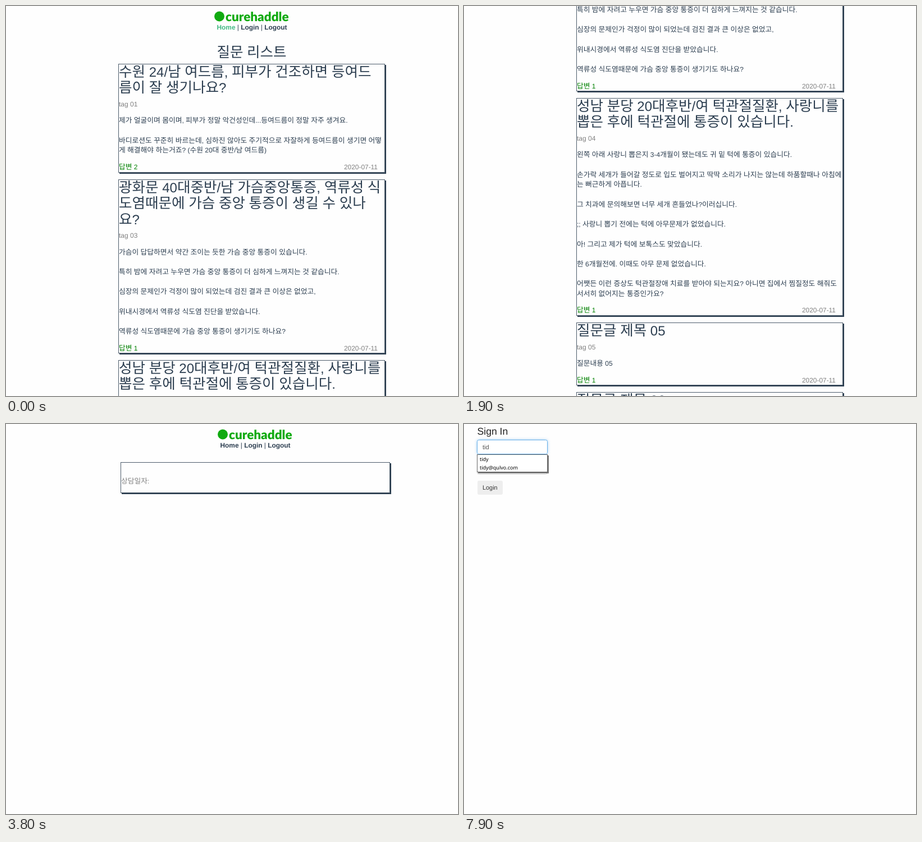
Recreate the animation shown at these times as an HTML page. Size 805 px wide and 695 px high, loop 8 s.

```html
<!DOCTYPE html>
<html lang="ko">
<head>
<meta charset="utf-8">
<style>
  html, body { margin: 0; width: 100%; height: 100%; overflow: hidden; background: #fefefe; }
  svg { display: block; width: 805px; height: 695px; }
  text {
    font-family: "Liberation Sans", "Noto Sans CJK KR", "Noto Sans CJK", sans-serif;
    text-rendering: geometricPrecision;
    white-space: pre;
  }
  .ko { font-family: "Noto Sans CJK KR", "Noto Sans CJK", sans-serif; }
  .logo { font-family: Lato, sans-serif; font-weight: 900; }
  .menu { font-family: "Noto Sans", sans-serif; }
</style>
</head>
<body>
<svg id="stage" viewBox="0 0 805 695"></svg>
<script>
const INK = '#2c3e50', GREEN = '#10aa10', GRAY = '#808080';
const TITLE_LINE = 28.3, BODY_LINE = 17.68;

// Hangul is set slightly larger than the Latin text beside it.
const mixed = (s, size) =>
  s.replace(/[가-힣]+/g, run => `<tspan class="ko" font-size="${size * 1.065}">${run}</tspan>`);

const text = (s, x, mid, size, fill, attrs = '') =>
  `<text x="${x}" y="${mid + size * 0.36}" font-size="${size}" fill="${fill}" ${attrs}>${mixed(s, size)}</text>`;

const rect = (x, y, w, h, fill, attrs = '') =>
  `<rect x="${x}" y="${y}" width="${w}" height="${h}" fill="${fill}" ${attrs}/>`;

const panel = (x, y, w, h) =>
  rect(x + 2, y + 2, w, h, INK) +
  rect(x + 0.5, y + 0.5, w - 1, h - 1, '#fefefe', 'stroke="#4d5c6b"');

const header = (cx, homeColor) => `
  <circle cx="${cx - 58}" cy="18.5" r="9" fill="${GREEN}"/>
  ${text('curehaddle', cx - 47, 18.5, 22.5, GREEN, 'class="logo"')}
  <text x="${cx}" y="42" font-size="11.9" font-weight="bold" text-anchor="middle" fill="${INK}"><tspan
    fill="${homeColor}">Home</tspan><tspan font-weight="normal"> | </tspan>Login<tspan
    font-weight="normal"> | </tspan>Logout</text>`;

const questions = [
  { tag: '01', answers: 2,
    title: ['수원 24/남 여드름, 피부가 건조하면 등여드', '름이 잘 생기나요?'],
    body: ['제가 얼굴이며 몸이며, 피부가 정말 악건성인데...등여드름이 정말 자주 생겨요.', '',
      '바디로션도 꾸준히 바르는데, 심하진 않아도 주기적으로 자잘하게 등여드름이 생기면 어떻',
      '게 해결해야 하는거죠? (수원 20대 중반/남 여드름)'] },
  { tag: '03', answers: 1,
    title: ['광화문 40대중반/남 가슴중앙통증, 역류성 식', '도염때문에 가슴 중앙 통증이 생길 수 있나', '요?'],
    body: ['가슴이 답답하면서 약간 조이는 듯한 가슴 중앙 통증이 있습니다.', '',
      '특히 밤에 자려고 누우면 가슴 중앙 통증이 더 심하게 느껴지는 것 같습니다.', '',
      '심장의 문제인가 걱정이 많이 되었는데 검진 결과 큰 이상은 없었고,', '',
      '위내시경에서 역류성 식도염 진단을 받았습니다.', '',
      '역류성 식도염때문에 가슴 중앙 통증이 생기기도 하나요?'] },
  { tag: '04', answers: 1,
    title: ['성남 분당 20대후반/여 턱관절질환, 사랑니를', '뽑은 후에 턱관절에 통증이 있습니다.'],
    body: ['왼쪽 아래 사랑니 뽑은지 3-4개월이 됐는데도 귀 밑 턱에 통증이 있습니다.', '',
      '손가락 세개가 들어갈 정도로 입도 벌어지고 딱딱 소리가 나지는 않는데 하품할때나 아침에',
      '는 뻐근하게 아픕니다.', '',
      '그 치과에 문의해보면 너무 세개 흔들었나?이러십니다.', '',
      ';; 사랑니 뽑기 전에는 턱에 아무문제가 없었습니다.', '',
      '아! 그리고 제가 턱에 보톡스도 맞았습니다.', '',
      '한 6개월전에. 이때도 아무 문제 없었습니다.', '',
      '어쨋든 이런 증상도 턱관절장애 치료를 받아야 되는지요? 아니면 집에서 찜질정도 해줘도',
      '서서히 없어지는 통증인가요?'] },
  ...['05', '06', '07'].map(n => ({ tag: n, answers: 1, title: ['질문글 제목 ' + n], body: ['질문내용 ' + n] })),
];

let nextCardY = 103;
const cards = questions.map(({ tag, answers, title, body }) => {
  const y = Math.round(nextCardY);
  const tagY = y + title.length * TITLE_LINE + 15;
  const bodyY = tagY + 29.5;
  const footY = bodyY + (body.length - 1) * BODY_LINE + 29.5;
  const height = title.length * TITLE_LINE + body.length * BODY_LINE + 78.3;
  nextCardY += height;
  return panel(200, y, 475, Math.round(height) - 12) +
    title.map((s, i) => text(s, 201, y + 14.5 + i * TITLE_LINE, 24, INK)).join('') +
    text('tag ' + tag, 201, tagY, 12, GRAY) +
    body.map((s, i) => s && text(s, 201, bodyY + i * BODY_LINE, 12, INK)).join('') +
    text('답변 ' + answers, 201, footY, 12, '#008000') +
    text('2020-07-11', 602, footY, 11.9, GRAY);
}).join('');

const field = (y, id, hint) =>
  rect(23.5, y + 0.5, 125, 25, '#fff', `id="${id}" rx="3" stroke="#ccc"`) +
  text(hint, 33, y + 13, 10.4, '#999', `id="${id}Hint" clip-path="url(#fieldClip)"`);

const $ = id => document.getElementById(id);

$('stage').innerHTML = `
  <defs><clipPath id="fieldClip"><rect x="33" y="0" width="106" height="200"/></clipPath></defs>
  <g id="list">
    ${header(438, '#42b983')}
    ${text('질문 리스트', 437.5, 82, 24, INK, 'text-anchor="middle"')}
    ${cards}
  </g>
  <g id="detail">
    ${header(444, INK)}
    ${rect(424, 43, 32, 1, INK, 'id="underline"')}
    ${panel(204, 68, 480, 55)}
    ${text('상담일자:', 205, 102, 12, GRAY)}
  </g>
  <g id="signIn">
    ${text('Sign In', 23.5, 12.5, 17.6, '#222')}
    ${field(28, 'email', '이메일 주소를 입력 해주세요')}
    ${field(64, 'password', '비밀번호를 입력해 주세요')}
    ${rect(24, 101, 45, 25, '#eee', 'rx="3"')}
    ${text('Login', 33, 113.5, 10.9, '#333')}
    ${text('', 33, 41, 11, '#555', 'id="typed"')}
    ${rect(36, 35, 1, 12, '#333', 'id="caret"')}
    <g id="suggestions"></g>
  </g>`;

const show = (id, on) => $(id).setAttribute('display', on ? 'inline' : 'none');

const accounts = ['tidy', 'tidy@qulvo.com', 'todo@qulvo.com', 'admin', 'guest'];
const suggestions = count => {
  if (!count) return '';
  const h = count * 15 + 2;
  return rect(25, 56, 126, h, '#777') +
    rect(23.5, 54.5, 125, h - 1, '#fff', 'stroke="#666"') +
    accounts.slice(0, count).map((s, i) =>
      text(s, 28, 62.5 + i * 14.8, 9, '#000', 'class="menu"')).join('');
};

// Each scroll: first step, number of 100 ms steps, start and end offset.
const scrolls = [[500, 3, 0, 220], [900, 4, 220, 450], [1900, 4, 450, 556], [2700, 6, 556, 0]];
const smooth = p => p * p * (3 - 2 * p);

function scrollAt(t) {
  let y = 0;
  for (const [start, steps, from, to] of scrolls) {
    if (t < start) break;
    const p = Math.min(1, (Math.floor((t - start) / 100) + 1) / steps);
    y = from + (to - from) * smooth(p);
  }
  return Math.round(y);
}

function render(t) {
  show('list', t < 3800);
  show('detail', t >= 3800 && t < 6300);
  show('signIn', t >= 6300);
  $('list').setAttribute('transform', `translate(0 ${-scrollAt(t)})`);
  show('underline', t >= 5100);

  const focus = t < 7000 ? 0 : t < 7100 ? 0.6 : 1;
  $('email').setAttribute('stroke', focus ? '#66afe9' : '#ccc');
  $('email').style.filter = focus ? `drop-shadow(0 0 2.5px rgba(102,175,233,${focus * 0.6}))` : 'none';

  const typed = 'tid'.slice(0, t < 7300 ? 0 : t < 7800 ? 1 : t < 7900 ? 2 : 3);
  $('typed').textContent = typed;
  show('emailHint', !typed);
  show('caret', t >= 7000 && t < 7500);
  $('caret').setAttribute('x', typed ? 36 : 33);
  $('suggestions').innerHTML = suggestions(t < 7200 ? 0 : t < 7300 ? 5 : t < 7800 ? 3 : 2);
}

const began = performance.now();
function tick() {
  render((performance.now() - began) % 8000);
  requestAnimationFrame(tick);
}
tick();
</script>
</body>
</html>
```
